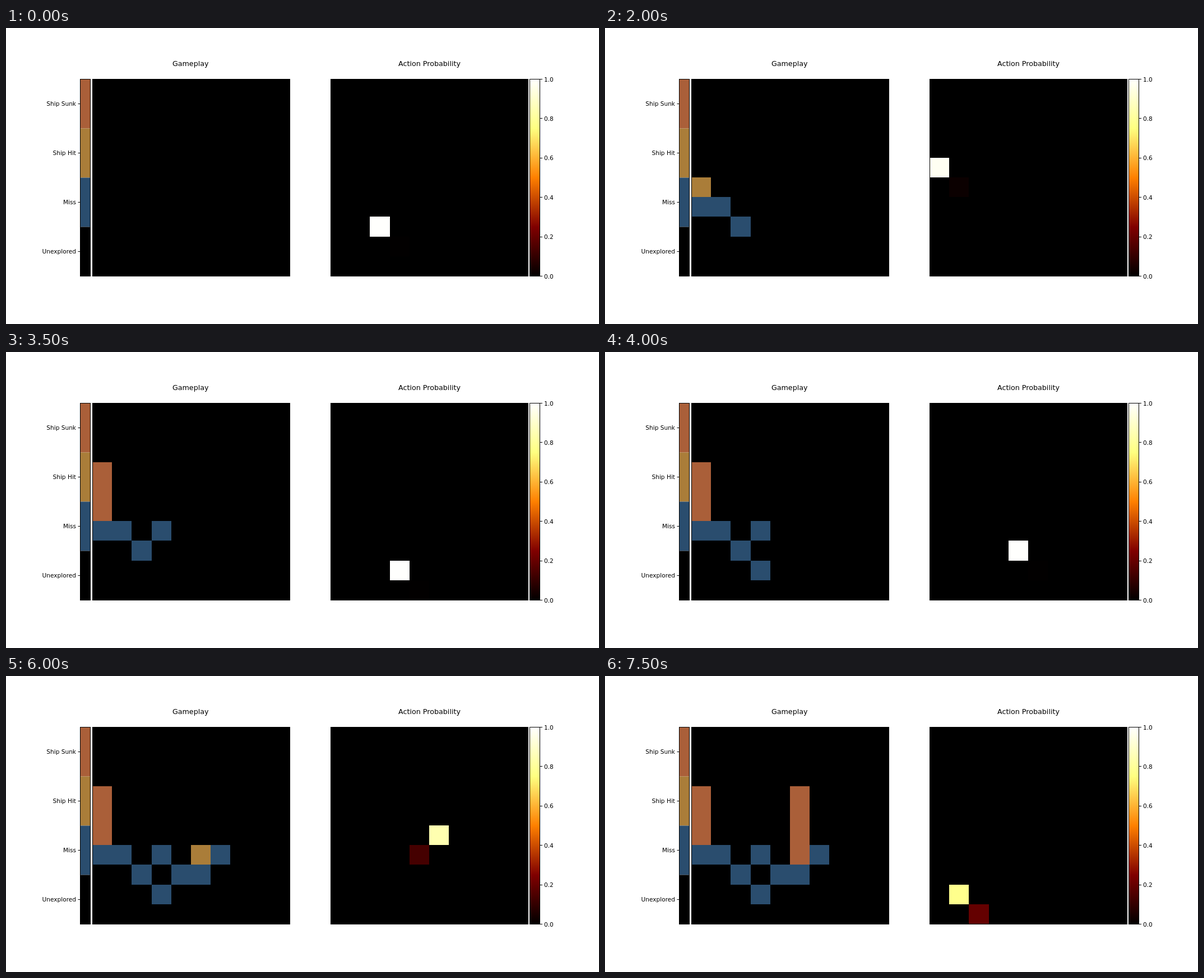
These frames come from a looping animation (1058 by 529 pixels, 8 s). An HTML page:

```html
<!DOCTYPE html>
<html lang="en">
<head>
<meta charset="utf-8">
<title>Gameplay and action probability</title>
<style>
  html, body { margin: 0; width: 100%; height: 100%; overflow: hidden; background: #fff; }
  svg { display: block; width: 100%; height: 100%; }
  text { font-family: "DejaVu Sans", sans-serif; font-size: 10.58px; }
  .title { font-size: 12.7px; text-anchor: middle; }
  .end { text-anchor: end; }
</style>
</head>
<body>
<svg viewBox="0 0 1058 529">
  <defs>
    <linearGradient id="heat" x1="0" y1="1" x2="0" y2="0">
      <stop offset="0" stop-color="#000"/>
      <stop offset=".25" stop-color="#800000"/>
      <stop offset=".5" stop-color="#ff8000"/>
      <stop offset=".75" stop-color="#ffff80"/>
      <stop offset="1" stop-color="#fff"/>
    </linearGradient>
  </defs>
  <g id="back"></g>
  <g id="cells" shape-rendering="crispEdges"></g>
  <g id="front"></g>
</svg>
<script>
const STEP = 500, LOOP = 8000;
const LEFT = 154.5, RIGHT = 579.5, TOP = 91.5, SIZE = 352, CELL = SIZE / 10;
const SUNK = "#aa5f39", HIT = "#aa7d39", MISS = "#2a4d6e";
const SURE = .004;

// Both ships stand upright; doubt is felt when the climb along one starts
const ships = [
  { col: 0, top: 3, bottom: 5, doubt: .025 },
  { col: 5, top: 3, bottom: 6, doubt: .155 }
];
const search = [[2, 7], [1, 6], [0, 5], [3, 6], [3, 8], [4, 7], [5, 6], [1, 8, .225]];

const shipAt = (col, row) => ships.find(s => s.col === col && row >= s.top && row <= s.bottom);

// After a hit: probe below, then to the right unless at the wall, then climb until sunk
function playGame() {
  const shots = [];
  const shoot = (col, row, doubt = SURE) => shots.push({ col, row, doubt, ship: shipAt(col, row) });
  for (const [col, row, doubt] of search) {
    shoot(col, row, doubt);
    const ship = shipAt(col, row);
    if (!ship) continue;
    shoot(col, row + 1);
    if (col > 0) shoot(col + 1, row);
    for (let r = row - 1; r >= ship.top; r--) shoot(col, r, r === row - 1 ? ship.doubt : SURE);
    ship.sunkAt = shots.length;
  }
  return shots;
}
const shots = playGame();

const rect = (x, y, w, h, fill, stroke = "none") =>
  `<rect x="${x}" y="${y}" width="${w}" height="${h}" fill="${fill}" stroke="${stroke}"/>`;
const label = (x, y, str, cls = "") => `<text x="${x}" y="${y}" class="${cls}">${str}</text>`;
const tick = (x, y) => `<path d="M${x} ${Math.floor(y) + .5}h4" stroke="#000"/>`;
const put = (id, markup) => document.getElementById(id).innerHTML = markup;

function heat(p) {
  const ch = v => Math.round(255 * Math.min(1, Math.max(0, v)));
  return `rgb(${ch(2 * p)},${ch(2 * p - .5)},${ch(2 * p - 1)})`;
}

function cell(x0, col, row, fill) {
  const x = c => Math.floor(x0 + c * CELL), y = r => Math.floor(TOP + r * CELL);
  return rect(x(col), y(row), x(col + 1) - x(col), y(row + 1) - y(row), fill);
}

function drawAxes() {
  let back = "", front = label(329.2, 68, "Gameplay", "title") + label(755.5, 68, "Action Probability", "title");
  for (const x of [LEFT, RIGHT]) {
    back += rect(x, TOP, SIZE, SIZE, "#000");
    front += rect(x, TOP, SIZE, SIZE, "none", "#000");
  }

  const kinds = [["Ship Sunk", SUNK], ["Ship Hit", HIT], ["Miss", MISS], ["Unexplored", "#000"]];
  const band = SIZE / kinds.length;
  kinds.forEach(([name, fill], i) => {
    const y = TOP + i * band, mid = y + band / 2;
    back += rect(132.5, y, 18, band, fill);
    front += tick(128.5, mid) + label(125, mid + 3.8, name, "end");
  });
  front += rect(132.5, TOP, 18, SIZE, "none", "#000");

  front += rect(934.5, TOP, 18, SIZE, "url(#heat)", "#000");
  for (let i = 0; i <= 5; i++) {
    const y = TOP + i * SIZE / 5;
    front += tick(953, y) + label(960, y + 4, (1 - i / 5).toFixed(1));
  }
  put("back", back);
  put("front", front);
}

function drawStep(step) {
  let out = "";
  for (const { col, row, ship } of shots.slice(0, step))
    out += cell(LEFT, col, row, !ship ? MISS : step >= ship.sunkAt ? SUNK : HIT);

  // The runner-up lies diagonally below, towards the middle
  const { col, row, doubt } = shots[step];
  out += cell(RIGHT, col + (col < 5 ? 1 : -1), row + 1, heat(doubt * .87));
  out += cell(RIGHT, col, row, heat(1 - doubt));
  put("cells", out);
}

let shown = -1;
function frame() {
  const step = Math.floor(performance.now() % LOOP / STEP);
  if (step !== shown) drawStep(shown = step);
  requestAnimationFrame(frame);
}

drawAxes();
frame();
</script>
</body>
</html>
```
